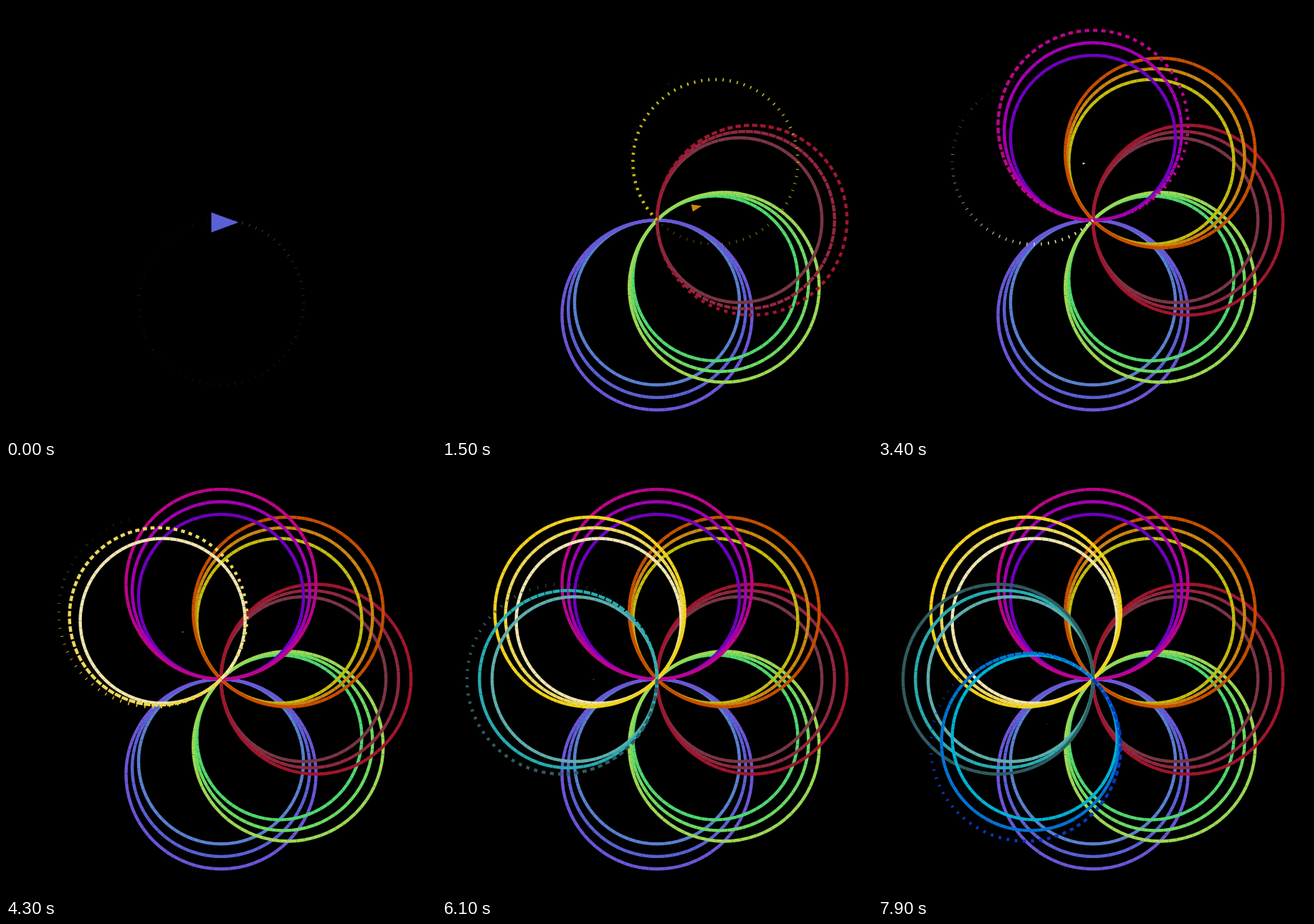
Animation, 600 px wide and 602 px high, one loop 8000 ms. Source, as an HTML page with a canvas:

```html
<!DOCTYPE html>
<html>
<head>
<meta charset="utf-8">
<style>
  html, body { margin: 0; width: 100%; height: 100%; overflow: hidden; background: #000; }
  canvas { display: block; }
</style>
</head>
<body>
<canvas id="stage" width="600" height="602"></canvas>
<script>
const ctx = document.getElementById('stage').getContext('2d');
const LOOP = 8, GROW = 0.9, STEPS = 72, CX = 300, CY = 299.1, TAU = Math.PI * 2;
const RADII = [115.1, 123.9, 132.6];
const COLORS = [
  '#5a80d0', '#5b60d4', '#6c56d8',
  '#4fd86e', '#6cdb62', '#9cd855',
  '#7a3645', '#8f283e', '#a0162e',
  '#c4bc10', '#cc8610', '#c64e00',
  '#7000c0', '#a400b4', '#bc058a',
  '#f0e6b0', '#ecd858', '#f2d21c',
  '#5faeac', '#28acb0', '#305c60',
  '#00b2d4', '#0074d4', '#0838b8'
];

// Drawing slows as rings add up: the start time is quadratic in ring progress.
const A = 0.0134, B = 0.01, C = 0.0234;
const startTime = s => A * s * s + B * s - C - 0.1 * Math.max(0, 1 - s) ** 2;
const progress = t => (Math.sqrt(B * B + 4 * A * (t + C)) - B) / (2 * A);
const ease = x => x < 1 ? 0.5 - 0.5 * Math.cos(Math.PI * x) : 1;

function drawRing(n, t) {
  const r = RADII[n % 3];
  const dir = Math.PI / 2 - Math.floor(n / 3) * Math.PI / 4;
  const x = CX + r * Math.cos(dir), y = CY + r * Math.sin(dir);
  const point = k => {
    const a = dir + Math.PI + k / STEPS * TAU;
    return [x + r * Math.cos(a), y + r * Math.sin(a)];
  };
  ctx.strokeStyle = COLORS[n];
  for (let k = 0; k < STEPS; k++) {
    const age = t - startTime(n + k / STEPS);
    if (age <= 0) break;
    // Each segment eases out to its full length.
    const f = Math.min(1, 0.008 + ease(age / GROW));
    const [x0, y0] = point(k), [x1, y1] = point(k + 1);
    ctx.beginPath();
    ctx.moveTo(x0, y0);
    ctx.lineTo(x0 + (x1 - x0) * f, y0 + (y1 - y0) * f);
    ctx.stroke();
  }
}

function drawTurtle(t) {
  const q = progress(t), decay = Math.exp(-t / 1.5);
  const a = (90 - 15 * (q - 3)) * Math.PI / 180;
  const r = 90 * (1 - decay), size = Math.max(decay, 0.05);
  ctx.save();
  ctx.translate(CX + r * Math.cos(a), CY + r * Math.sin(a) + 3 * decay);
  ctx.rotate(-1.4 * (q - 1) * Math.PI / 180);
  ctx.scale(size, size);
  ctx.fillStyle = COLORS[Math.min(23, Math.floor(q))];
  ctx.beginPath();
  ctx.moveTo(24.5, 0);
  ctx.lineTo(-13.5, -14);
  ctx.lineTo(-13.5, 14);
  ctx.fill();
  ctx.restore();
}

const began = performance.now();
function frame() {
  const t = (performance.now() - began) / 1000 % LOOP;
  ctx.fillStyle = '#000';
  ctx.fillRect(0, 0, 600, 602);
  ctx.lineWidth = 4.4;
  COLORS.forEach((_, n) => drawRing(n, t));
  drawTurtle(t);
  requestAnimationFrame(frame);
}
frame();
</script>
</body>
</html>
```
